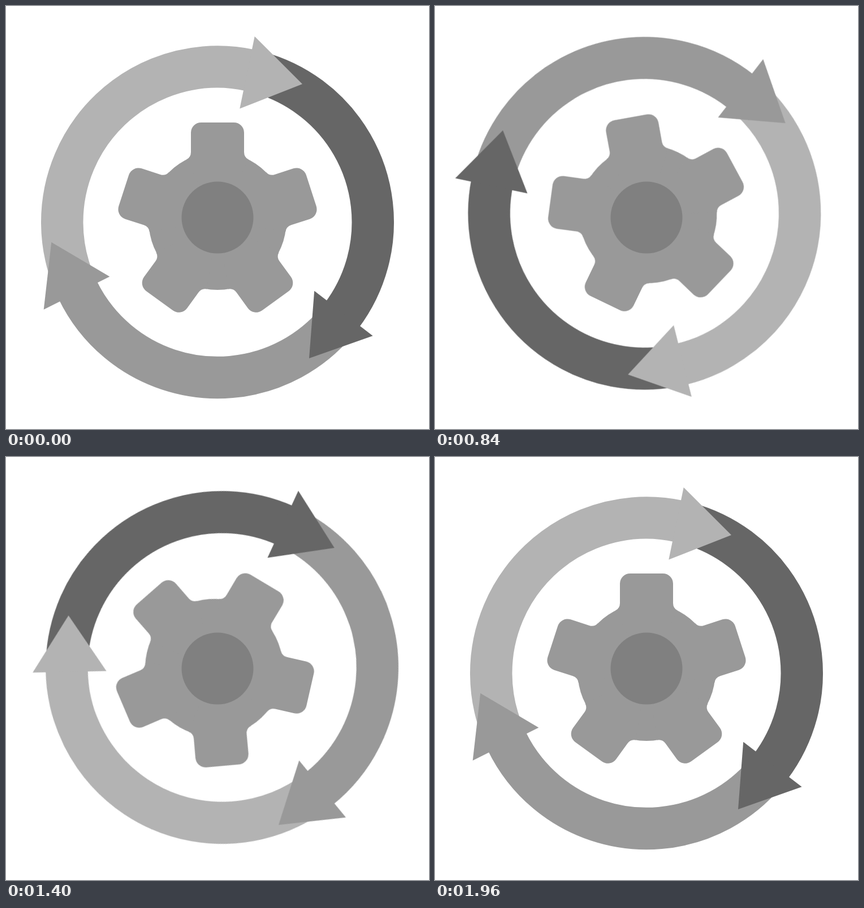
An HTML page that plays this animation: 748x748 px, repeating every 2 s.

```html
<!DOCTYPE html>
<html lang="en">
<head>
<meta charset="utf-8">
<title>Gear and cycle arrows</title>
<style>
  html, body { margin: 0; width: 100%; height: 100%; overflow: hidden; background: #fff; }
  svg { display: block; width: 100vw; height: 100vh; }

  /* Both parts sit slightly off the pivot, so they wobble as they turn. */
  .cycle, .gear {
    transform-origin: 374px 374px;
    animation: turn 2s steps(50, jump-none) infinite;
  }
  .gear { animation-direction: normal; animation-name: turn-back; fill: #999; }

  .light { --tone: #b3b3b3; }
  .mid   { --tone: #999; }
  .dark  { --tone: #666; }
  .cycle circle { fill: none; stroke: var(--tone); stroke-width: 74.5; }
  .cycle polygon { fill: var(--tone); }

  @keyframes turn { to { transform: rotate(360deg); } }
  @keyframes turn-back { to { transform: rotate(-360deg); } }
</style>
</head>
<body>
<svg viewBox="0 0 748 748">
  <defs>
    <path id="tooth" d="M0 0L-55.2 -108.5A15 15 0 0 0 -47 -121.8V-156.3A18 18 0 0 1 -29 -174.3
      H29A18 18 0 0 1 47 -156.3V-121.8A15 15 0 0 0 55.2 -108.5Z"/>
  </defs>

  <g class="cycle">
    <!-- Bands first, then heads, so each head overlaps the next band. -->
    <g transform="translate(374 382.3)">
      <circle class="dark" r="274.75" pathLength="360" stroke-dasharray="112 360" transform="rotate(-75)"/>
      <circle class="mid" r="274.75" pathLength="360" stroke-dasharray="114.3 360" transform="rotate(40)"/>
      <circle class="light" r="274.75" pathLength="360" stroke-dasharray="124.2 360" transform="rotate(158)"/>
    </g>
    <polygon class="light" points="439.7,53.7 524,138 413.3,181.5"/>
    <polygon class="dark" points="545.2,503.7 648.6,583.2 536,623"/>
    <polygon class="mid" points="183.3,478.4 66.7,536.7 80.3,417.8"/>
  </g>

  <g class="gear">
    <g transform="translate(374 380.3)">
      <circle r="121.7"/>
      <use href="#tooth"/>
      <use href="#tooth" transform="rotate(72)"/>
      <use href="#tooth" transform="rotate(144)"/>
      <use href="#tooth" transform="rotate(216)"/>
      <use href="#tooth" transform="rotate(288)"/>
    </g>
  </g>
  <circle cx="374" cy="374" r="63.5" fill="#808080"/>
</svg>
</body>
</html>
```
